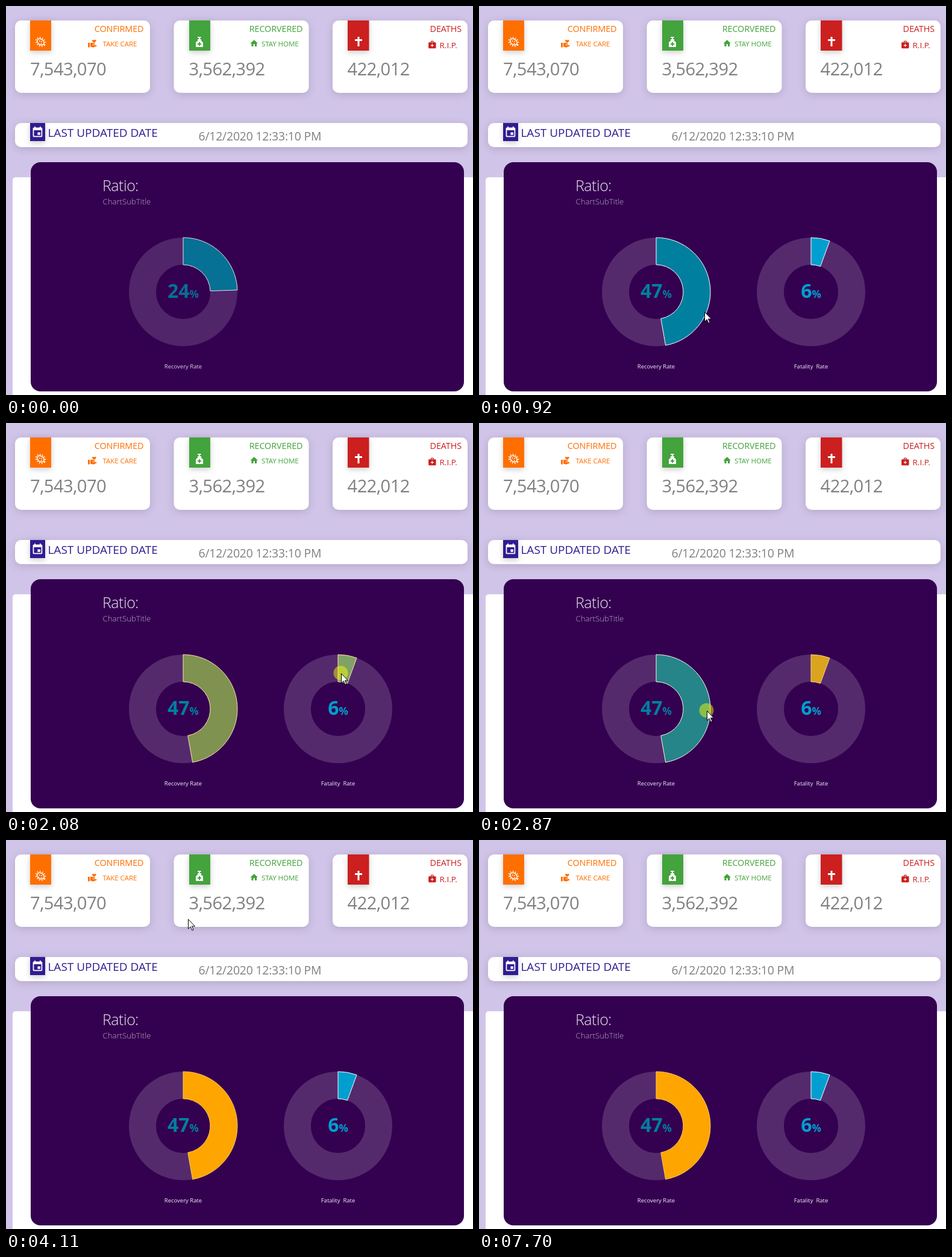
An HTML page for the animation above (8.32 s loop, 775 by 645 pixels).

```html
<!DOCTYPE html>
<html lang="en">
<head>
<meta charset="utf-8">
<title>Case dashboard</title>
<style>
  html, body { margin: 0; width: 100%; height: 100%; overflow: hidden; background: #d1c4e9; }
  svg { display: block; font-family: "Open Sans", "Noto Sans", sans-serif; }
  text { white-space: pre; }
  .card { fill: #fff; filter: drop-shadow(0 3px 7px rgba(0, 0, 0, .14)); }
  .badge { filter: drop-shadow(0 3px 5px rgba(0, 0, 0, .2)); }
  .head { font-size: 14.4px; letter-spacing: -.1px; text-anchor: end; }
  .note { font-size: 11.6px; letter-spacing: -.1px; }
  .count { font-size: 29.1px; letter-spacing: -.5px; fill: #808080; }
  .date { font-size: 19.4px; letter-spacing: -.2px; fill: #808080; }
  .title { font-size: 25px; font-weight: 300; letter-spacing: -.5px; fill: #eee8f2; }
  .sub { font-size: 13.2px; font-weight: 300; fill: #b9a8c4; }
  .label { font-size: 9.5px; fill: #f2edf5; text-anchor: middle; }
  .value { font-size: 32px; font-weight: 700; text-anchor: middle; }
  .unit { font-size: 17px; }
</style>
</head>
<body>
<svg width="775" height="645" viewBox="0 0 775 645">
  <rect width="775" height="645" fill="#d1c4e9"/>

  <rect class="card" x="15" y="24" width="224" height="120" rx="10"/>
  <rect class="card" x="278.5" y="24" width="224" height="120" rx="10"/>
  <rect class="card" x="542" y="24" width="224" height="120" rx="10"/>
  <rect class="card" x="15" y="194" width="751" height="40" rx="10"/>

  <!-- confirmed -->
  <g fill="#ff6f00">
    <rect class="badge" x="40" y="24" width="35" height="50"/>
    <g transform="translate(57.5 59.5) rotate(38)" fill="none" stroke="#fff">
      <ellipse rx="6.2" ry="4.6" stroke-width="1.5"/>
      <ellipse rx="8.2" ry="6.6" stroke-width="2.4" stroke-dasharray="1.4 2.7"/>
      <path d="M-3 0h1.6M0 -1.5h1.6M2 1.5h1.6" stroke-width="1.6"/>
    </g>
    <text class="head" x="228.5" y="43">CONFIRMED</text>
    <path d="M136 61h3v7.5h-3zM140 61h3.5l4 1.6v1.4h-3.5l-1.4-.4 1.5 1.2h5.4l1.3 1.5-6 2.5-4.800-1.200zM146.300 61.500l-3-3c-1.300-1.500.8-3.700 3-1.700 2.200-2 4.300.2 3 1.700z"/>
    <text class="note" x="160.500" y="67">TAKE CARE</text>
    <text class="count" x="40" y="115">7,543,070</text>
  </g>

  <!-- recovered -->
  <g fill="#43a33c">
    <rect class="badge" x="304" y="24" width="35" height="50"/>
    <path d="M318 51h5.500v2h-1.500v2h2v3c2.200.7 3 2 3 4v6h-12v-6c0-2 .8-3.300 3-4v-3h2v-2h-2z" fill="#fff"/>
    <path d="M320 60h2v2h2v2h-2v2h-2v-2h-2v-2h2z"/>
    <text class="head" x="492.500" y="43">RECORVERED</text>
    <path transform="translate(404.300 54.500) scale(.62)" d="M10 20v-6h4v6h5v-8h3L12 3 2 12h3v8z"/>
    <text class="note" x="424" y="67">STAY HOME</text>
    <text class="count" x="303.500" y="115">3,562,392</text>
  </g>

  <!-- deaths -->
  <g fill="#cc1f1f">
    <rect class="badge" x="567" y="24" width="35.500" height="50"/>
    <path d="M583.500 51h3v4h4.500v3h-4.500v9h-3v-9h-4.500v-3h4.500z" fill="#fff"/>
    <text class="head" x="756" y="43">DEATHS</text>
    <path transform="translate(699.900 56.600) scale(.62)" fill-rule="evenodd" d="M20 6h-4V4c0-1.100-.9-2-2-2h-4c-1.100 0-2 .9-2 2v2H4c-1.100 0-2 .9-2 2v12c0 1.100.9 2 2 2h16c1.100 0 2-.9 2-2V8c0-1.100-.9-2-2-2zM10 4h4v2h-4zM16 15h-3v3h-2v-3H8v-2h3v-3h2v3h3z"/>
    <text x="719.500" y="70" font-size="13.500">R.I.P.</text>
    <text class="count" x="566.500" y="115">422,012</text>
  </g>

  <!-- last update -->
  <g fill="#311b92">
    <rect class="badge" x="40" y="194" width="25" height="30"/>
    <path transform="translate(42 199) scale(.87)" fill="#fff" fill-rule="evenodd" d="M17 12h-5v5h5zM16 1v2H8V1H6v2H5c-1.100 0-2 .9-2 2v14c0 1.100.9 2 2 2h14c1.100 0 2-.9 2-2V5c0-1.100-.9-2-2-2h-1V1zM19 19H5V8h14z"/>
    <text x="69.500" y="217" font-size="19">LAST UPDATED DATE</text>
  </g>
  <text class="date" x="319.500" y="223">6/12/2020 12:33:10 PM</text>

  <rect x="11" y="284" width="780" height="380" rx="5" fill="#fff"/>
  <rect x="41" y="259" width="719" height="380" rx="16" fill="#340050"/>
  <text class="title" x="160" y="307">Ratio:</text>
  <text class="sub" x="160.500" y="329">ChartSubTitle</text>

  <g id="charts"></g>

  <circle id="click" r="12" fill="#ff0" fill-opacity=".47"/>
  <path id="cursor" d="M.5 .5v15.800l3.600-3.500 2.700 6 2.300-1-2.600-5.800h5z" fill="#fff" stroke="#000"/>
</svg>

<script>
const LOOP = 8320;
const CY = 474, OUTER = 90, INNER = 45;
const WHITE = [255, 255, 255], ORANGE = [255, 165, 0], PALE = [255, 200, 96];

// picks: [time, 1 = selected / 0 = released]
const charts = [
  { cx: 294, share: 47.22, label: 'Recovery Rate', color: [0, 127, 159],
    start: -517, grow: 1000, fade: 588, picks: [[950, 1], [1905, 0], [2820, 1]] },
  { cx: 551, share: 5.6, label: 'Fatality  Rate', color: [0, 159, 208],
    start: 0, grow: 900, fade: 700, picks: [[1905, 1], [2820, 0]] }
];
const PICK_MS = 350;

// pointer stops: [time, x, y]
const path = [
  [630, 619, 496], [920, 374, 507], [1440, 374, 507], [1830, 556, 415],
  [2110, 556, 415], [2240, 580, 440], [2310, 590, 447], [2550, 410, 478],
  [2710, 378, 477], [3060, 378, 477], [3510, 540, 192], [3580, 600, 197],
  [3760, 675, 175], [4110, 303, 131], [4340, 55, 57], [4450, 40, 0],
  [5120, 598, 149], [6370, 598, 149]
];
const corner = [7460, 7700, 766, -16];
const clicks = [[935, 1100], [1900, 2130], [2790, 2990]];

const $ = id => document.getElementById(id);
const clamp = v => Math.max(0, Math.min(1, v));
const lerp = (a, b, k) => a + (b - a) * k;
const mix = (a, b, k) => `rgb(${a.map((v, i) => Math.round(lerp(v, b[i], k)))})`;

function node(tag, attrs, parent) {
  const el = document.createElementNS('http://www.w3.org/2000/svg', tag);
  for (const key in attrs) el.setAttribute(key, attrs[key]);
  return parent.appendChild(el);
}

for (const c of charts) {
  c.group = node('g', {}, $('charts'));
  node('circle', { cx: c.cx, cy: CY, r: (OUTER + INNER) / 2, fill: 'none',
    stroke: '#fff', 'stroke-opacity': .165, 'stroke-width': OUTER - INNER }, c.group);
  c.slice = node('path', {}, c.group);
  const value = node('text', { class: 'value', x: c.cx, y: 484, fill: mix(c.color, c.color, 0) }, c.group);
  c.number = node('tspan', {}, value);
  node('tspan', { class: 'unit' }, value).textContent = '%';
  node('text', { class: 'label', x: c.cx, y: 601 }, c.group).textContent = c.label;
}

function slicePath(cx, share) {
  const a = share / 100 * 2 * Math.PI;
  const at = r => `${cx + r * Math.sin(a)} ${CY - r * Math.cos(a)}`;
  const big = share > 50 ? 1 : 0;
  return `M${cx} ${CY - OUTER}A${OUTER} ${OUTER} 0 ${big} 1 ${at(OUTER)}` +
    `L${at(INNER)}A${INNER} ${INNER} 0 ${big} 0 ${cx} ${CY - INNER}Z`;
}

function picked(c, t) {
  let k = 0;
  for (const [time, to] of c.picks) k = lerp(k, to, clamp((t - time) / PICK_MS));
  return k;
}

function pointer(t) {
  if (t >= corner[0] && t < corner[1]) return corner.slice(2);
  const i = path.findIndex(p => t < p[0]);
  if (i < 1) return null;
  const [t0, x0, y0] = path[i - 1], [t1, x1, y1] = path[i];
  const k = (t - t0) / (t1 - t0);
  return [lerp(x0, x1, k), lerp(y0, y1, k)];
}

function draw(t) {
  for (const c of charts) {
    const share = c.share * clamp((t - c.start) / c.grow);
    const k = picked(c, t);
    c.group.setAttribute('opacity', clamp((t - c.start) / c.fade));
    c.slice.setAttribute('d', slicePath(c.cx, share));
    c.slice.setAttribute('fill', mix(c.color, ORANGE, k));
    c.slice.setAttribute('stroke', mix(WHITE, PALE, k));
    c.number.textContent = Math.round(share);
  }
  const pos = pointer(t);
  const down = clicks.some(([a, b]) => t >= a && t < b);
  $('cursor').style.display = pos ? '' : 'none';
  $('click').style.display = pos && down ? '' : 'none';
  if (pos) {
    const [x, y] = pos.map(Math.round);
    $('cursor').setAttribute('transform', `translate(${x} ${y})`);
    $('click').setAttribute('transform', `translate(${x - .5} ${y - .5})`);
  }
}

const begin = performance.now();
function tick() {
  draw((performance.now() - begin) % LOOP);
  requestAnimationFrame(tick);
}
draw(0);
requestAnimationFrame(tick);
</script>
</body>
</html>
```
